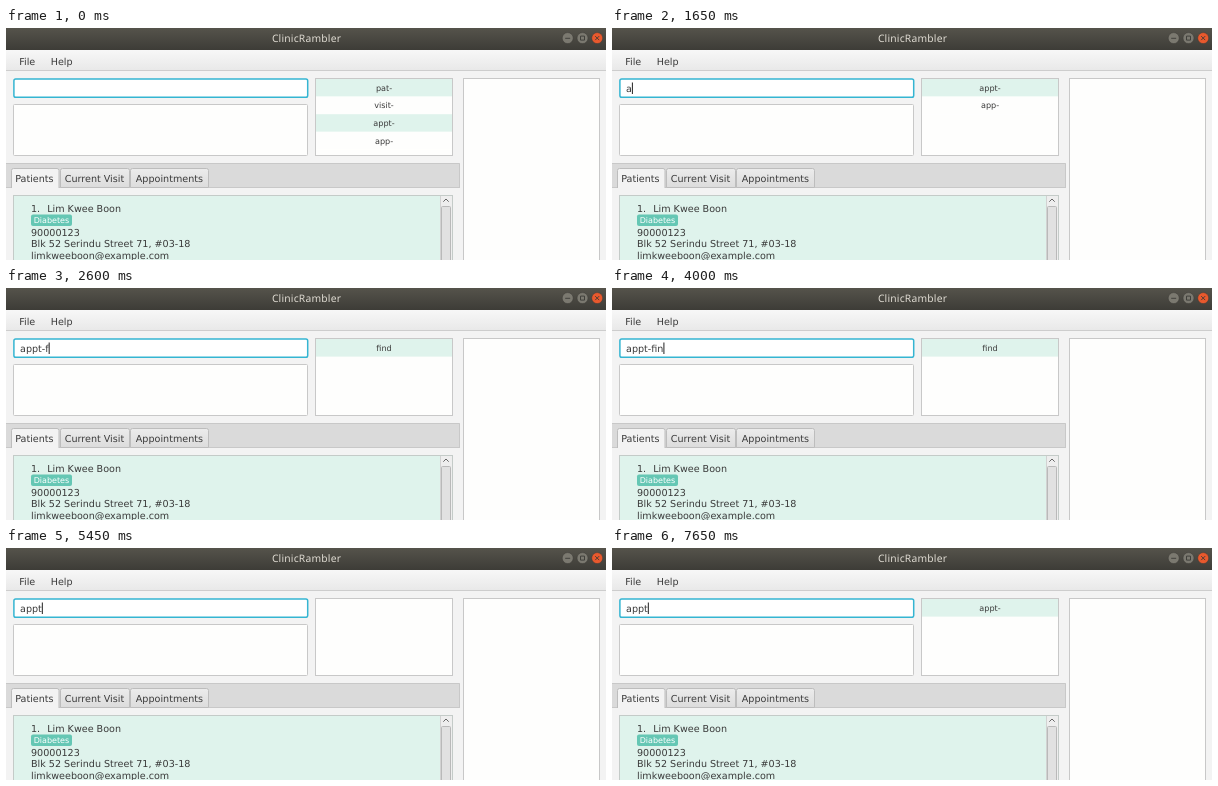
Write an HTML page that moves like this. It is 600 px wide and 232 px high and loops after 8 s.

```html
<!DOCTYPE html>
<html lang="en">
<head>
<meta charset="utf-8">
<title>ClinicRambler</title>
<style>
  html, body { margin: 0; width: 100%; height: 100%; overflow: hidden; background: #f3f3f3; }
  svg { display: block; width: 600px; height: 232px; }
  text {
    font: 9.6px "DejaVu Sans", sans-serif; fill: #3a3a3a;
    white-space: pre; text-rendering: geometricPrecision;
  }
  .title { font: 500 10.3px "Noto Sans", sans-serif; fill: #dfdbd2; text-anchor: middle; letter-spacing: .2px; }
  .row text { font-size: 8.1px; text-anchor: middle; }
  .tag { font-size: 8px; fill: #fff; }
  .panel { fill: #fefefd; stroke: #c8c8c8; }
  .tab { fill: url(#tabFill); stroke: #bdbdbd; }
  .glyph { fill: none; stroke: #3c3b37; stroke-width: .9; }
</style>
</head>
<body>
<svg viewBox="0 0 600 232">
  <defs>
    <linearGradient id="bar" x2="0" y2="1">
      <stop stop-color="#55534b"/><stop offset="1" stop-color="#3d3c37"/>
    </linearGradient>
    <linearGradient id="menu" x2="0" y2="1">
      <stop stop-color="#f8f8f8"/><stop offset="1" stop-color="#e8e8e8"/>
    </linearGradient>
    <linearGradient id="tabFill" x2="0" y2="1">
      <stop stop-color="#ececec"/><stop offset="1" stop-color="#dcdcdc"/>
    </linearGradient>
  </defs>

  <rect width="600" height="232" fill="#f3f3f3"/>
  <rect y="21" width="600" height="22" fill="url(#menu)"/>
  <rect y="42" width="600" height="1" fill="#cdcdcd"/>
  <rect width="600" height="22" fill="url(#bar)"/>
  <text class="title" x="300.5" y="14">ClinicRambler</text>
  <g stroke="#3c3b37" stroke-width=".5">
    <circle cx="561.7" cy="10.1" r="5.5" fill="#7b7970"/>
    <circle cx="576.5" cy="10.1" r="5.5" fill="#7b7970"/>
    <circle cx="591.2" cy="10.1" r="5.5" fill="#e9592d"/>
  </g>
  <path class="glyph" d="M559.2 10.3h5M574.5 8.1h4v4h-4zM589.2 8.1l4 4m0-4l-4 4"/>

  <text x="13.2" y="36.5">File</text>
  <text x="44.7" y="36.5">Help</text>

  <rect x="7.9" y="50.9" width="293.8" height="18.4" rx="1.8" fill="#fff" stroke="#35b5d2" stroke-width="1.5"/>
  <text id="input" x="14" y="63.5"></text>
  <rect id="caret" y="54.5" width="1" height="11.5" fill="#222"/>

  <rect class="panel" x="7.5" y="76.5" width="294" height="51" rx="1"/>
  <rect class="panel" x="309.5" y="50.5" width="137" height="77"/>
  <g id="list"></g>
  <rect class="panel" x="457.5" y="50.5" width="136" height="190"/>

  <rect y="135" width="454" height="25" fill="#dadada"/>
  <path d="M0 135.5h453.5V160M0 159.5h454" fill="none" stroke="#c8c8c8"/>
  <path class="tab" d="M54.5 159.5v-17q0-2 2-2h65q2 0 2 2v17z"/>
  <path class="tab" d="M124.5 159.5v-17q0-2 2-2h74q2 0 2 2v17z"/>
  <path d="M5.5 160v-17.5q0-2 2-2h43.5q2 0 2 2v17.5" fill="#f3f3f3" stroke="#bdbdbd"/>
  <text x="9.2" y="153.5">Patients</text>
  <text x="58.7" y="153.5">Current Visit</text>
  <text x="129.8" y="153.5">Appointments</text>

  <rect x="7.5" y="167.5" width="439" height="80" fill="#dff3ec" stroke="#c4cbc8"/>
  <rect x="434" y="168" width="12" height="64" fill="#eee"/>
  <path d="M434.5 168v64" stroke="#d2d2d2"/>
  <path d="M437.3 173.7l2.7-2.7 2.7 2.7" fill="none" stroke="#666"/>
  <rect x="435.5" y="178.5" width="9" height="70" rx="1" fill="#e1e1e1" stroke="#b9b9b9"/>
  <text x="25" y="184.3">1.</text>
  <text x="41.2" y="184.3">Lim Kwee Boon</text>
  <rect x="25" y="186.5" width="41" height="11.5" rx="2" fill="#65c7b4"/>
  <text class="tag" x="27.7" y="195.2">Diabetes</text>
  <text x="25" y="207.8">90000123</text>
  <text x="25" y="219.4">Blk 52 Serindu Street 71, #03-18</text>
  <text x="25" y="231.2">limkweeboon@example.com</text>
</svg>
<script>
  const LOOP = 8000;
  const input = document.getElementById("input");
  const caret = document.getElementById("caret");
  const list = document.getElementById("list");

  const all = ["pat-", "visit-", "appt-", "app-"];
  const both = ["appt-", "app-"];
  // start time, typed text, suggestions
  const steps = [
    [0, "", all],
    [1650, "a", both],
    [1850, "ap", both],
    [2000, "app", both],
    [2200, "appt", ["appt-"]],
    [2450, "appt-", ["find"]],
    [2600, "appt-f", ["find"]],
    [2650, "appt-fi", ["find"]],
    [2750, "appt-fin", ["find"]],
    [4100, "appt-find", []],
    [5250, "appt-", []],
    [5450, "appt", []],
    [5650, "app", []],
    [5850, "", []],
    [7050, "app", both],
    [7500, "appt", ["appt-"]]
  ];
  const caretOff = [[0, 150], [650, 1250], [3250, 3750], [4600, 5100], [6350, 6850]];

  function rowMarkup(label, i) {
    const y = 51 + i * 17.6;
    const fill = i % 2 ? "#fefefd" : "#dff3ec";
    return `<g class="row"><rect x="310" y="${y}" width="136" height="17.6" fill="${fill}"/>` +
      `<text x="378" y="${y + 11.8}">${label}</text></g>`;
  }

  let shown = null;
  function draw(t) {
    const step = steps.findLast(s => s[0] <= t);
    if (step !== shown) {
      shown = step;
      input.textContent = step[1];
      list.innerHTML = step[2].map(rowMarkup).join("");
      caret.setAttribute("x", 14 + (step[1] ? input.getComputedTextLength() : 0));
    }
    const hidden = caretOff.some(([from, to]) => t >= from && t < to);
    caret.setAttribute("visibility", hidden ? "hidden" : "visible");
  }

  const start = performance.now();
  function tick() {
    draw((performance.now() - start) % LOOP);
    requestAnimationFrame(tick);
  }
  tick();
</script>
</body>
</html>
```
